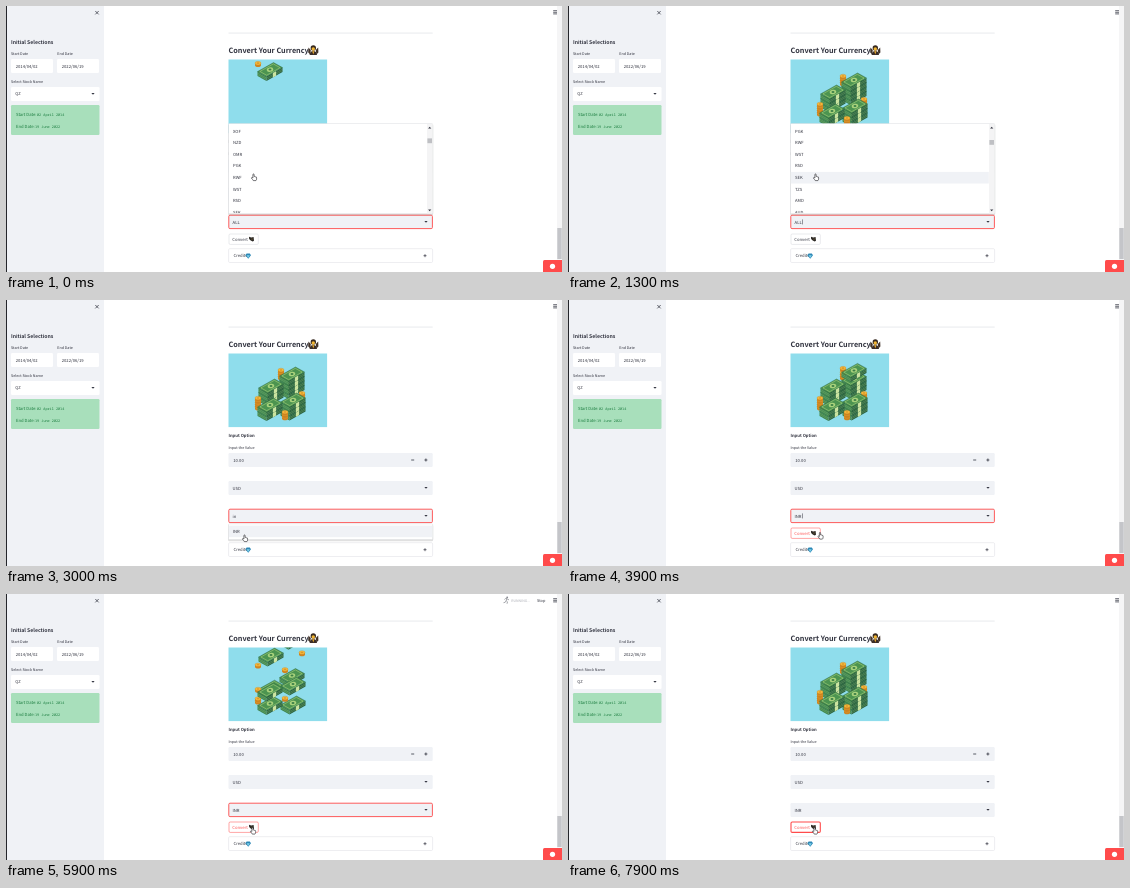
An HTML page for the animation above (8 s loop, 556 px wide and 266 px high).

```html
<!DOCTYPE html>
<html lang="en">
<head>
<meta charset="utf-8">
<title>Currency converter</title>
<style>
  html, body { margin: 0; width: 100%; height: 100%; overflow: hidden; background: #fff; }
  svg { display: block; width: 556px; height: 266px; }
  text {
    font-family: "Noto Sans CJK JP", "Noto Sans CJK SC", "Noto Sans CJK", "Open Sans", sans-serif;
    text-rendering: geometricPrecision;
    white-space: pre;
  }
  .mono { font-family: "Noto Sans Mono", "DejaVu Sans Mono", monospace; }
</style>
</head>
<body>
<svg id="stage" viewBox="0 0 556 266" xmlns="http://www.w3.org/2000/svg"></svg>
<script>
const LOOP = 8000, STEP = 100;
const INK = '#31333f', GREY = '#f0f2f6', RED = '#ff4b4b', GREEN = '#177a3c';
const ROW = 11.6;

// ---- markup helpers ----
const rect = (x, y, w, h, fill, more = '') =>
  `<rect x="${x}" y="${y}" width="${w}" height="${h}" fill="${fill}" ${more}/>`;
const line = (d, color = INK, width = .7, more = '') =>
  `<path d="${d}" fill="none" stroke="${color}" stroke-width="${width}" ${more}/>`;
const shape = (d, fill, more = '') => `<path d="${d}" fill="${fill}" ${more}/>`;
const dot = (x, y, r, fill) => `<circle cx="${x}" cy="${y}" r="${r}" fill="${fill}"/>`;
const text = (x, y, size, str, fill = INK, more = '') =>
  `<text x="${x}" y="${y}" font-size="${size}" fill="${fill}" ${more}>${str}</text>`;
const group = (id, body, more = '') => `<g id="${id}" ${more}>${body}</g>`;
const arrow = (x, y, up = 1) => shape(`M${x - 1.6} ${y - .8 * up}h3.2l-1.6 ${1.8 * up}z`, INK);
const poly = pts => 'M' + pts.map(p => p.join(' ')).join('L') + 'Z';
const BOLD = 'font-weight="700"';

// ---- money pieces ----
function bundle() {
  const at = (a, b) => [16 * a + 9 * b, -9 * a + 5 * b];
  const quad = (a, b) => poly([at(-a, -b), at(a, -b), at(a, b), at(-a, b)]);
  const [l, f, r] = [at(-.5, -.5), at(-.5, .5), at(.5, .5)];
  const drop = ([x, y], h) => [x, y + h];
  const side = (p, q, fill) => shape(poly([p, q, drop(q, 4.5), drop(p, 4.5)]), fill);
  let out = side(l, f, '#3f8550') + side(f, r, '#2a6140');
  for (const h of [1.5, 3])
    out += line(`M${drop(l, h)}L${drop(f, h)}L${drop(r, h)}`, '#8fc278', .35);
  out += shape(quad(.5, .5), '#4c9450', 'stroke="#28603a" stroke-width=".4"');
  out += line(quad(.42, .38), '#b4d884', .5);
  out += `<ellipse rx="3.3" ry="2.2" fill="#a9d27c" transform="rotate(-12)"/>`;
  out += `<ellipse rx="1.5" ry="1" fill="#3c7f47"/>`;
  const p = at(.1, .5), q = at(-.1, .5);
  return out + shape(poly([q, p, drop(p, 4.5), drop(q, 4.5)]), '#cbe4a0');
}
const coin = () =>
  shape('M-3 0v2a3 1.8 0 0 0 6 0v-2z', '#cf8420') +
  `<ellipse rx="3" ry="1.8" fill="#f6bd3e" stroke="#b8761f" stroke-width=".3"/>` +
  `<ellipse rx="1.5" ry=".8" fill="#dd9628"/>`;

// Stacks from back to front: x, top y, count, first delay, delay step
const STACKS = [
  [coin, 275, 70, 4, .42, .06],
  [bundle, 286, 74, 4, .2, .14],
  [bundle, 265, 86, 3, .16, .15],
  [coin, 296, 93, 3, .34, .1],
  [bundle, 287, 100, 3, .1, .15],
  [coin, 252, 98, 5, .01, .1],
  [bundle, 264, 105, 2, 0, .22],
  [coin, 279, 112, 3, .24, .1]
];
const pieces = [];
for (const [draw, x, top, count, delay, gap] of STACKS) {
  const h = draw === coin ? 2.2 : 4.5;
  for (let i = 0; i < count; i++)
    pieces.push({ draw, x, y: top + (count - 1 - i) * h, delay: Math.min(.65, delay + i * gap) });
}

// ---- page parts ----
function sidebar() {
  const field = (x, y, w) => rect(x, y, w, 14, '#fff', 'rx="1.2"');
  return rect(0, 0, 98, 266, GREY) + rect(0, 0, 1, 266, '#25262b') +
    line('M89.3 5l3.4 3.4M92.7 5l-3.4 3.4', INK, .75) +
    text(5, 38, 5.15, 'Initial Selections', INK, BOLD) +
    text(5, 48.6, 3.7, 'Start Date') + text(51.3, 48.6, 3.7, 'End Date') +
    field(5, 53, 42) + field(51, 53, 42) +
    text(9.7, 61.6, 4.2, '2014/04/02') + text(55.7, 61.6, 4.2, '2022/06/19') +
    text(5, 76.6, 3.7, 'Select Stock Name') +
    field(5, 81, 88.5) + text(9.3, 89.4, 4, 'QZ') + arrow(87, 87.8) +
    rect(5, 99, 88.5, 30, '#a8dfbb', 'rx="1.2"') +
    text(10, 110, 4.2, 'Start Date:', GREEN) + text(10, 122.2, 4.2, 'End Date:', GREEN) +
    text(31, 109.8, 3.5, '02 April 2014', GREEN, 'class="mono"') +
    text(29, 122, 3.5, '19 June 2022', GREEN, 'class="mono"');
}

function titleIcon() {
  return dot(307.3, 42, 2.7, '#37291f') + dot(307.3, 43, 1.7, '#f2b632') +
    shape('M302.4 41.5l2.4 2.5-.6 4.6-2-2z M312.2 41.5l-2.4 2.5.6 4.6 2-2z', '#41332a') +
    shape('M303.6 49q.4-4 3.7-4t3.7 4z', '#3a2d27') +
    shape('M306.2 45.2h2.2l-1.1 3.4z', '#e8a92c');
}

function content() {
  const box = y => rect(222.5, y, 204.2, 14, GREY, 'rx="1.2"');
  return rect(222.5, 26.7, 204.2, .7, '#dfe0e5') +
    text(222.5, 47, 7.25, 'Convert Your Currency', INK, BOLD) + titleIcon() +
    rect(222.5, 53.5, 98.6, 73.6, '#8fddec') +
    `<clipPath id="photo">${rect(222.5, 53.5, 98.6, 73.6, '#000')}</clipPath>` +
    `<g clip-path="url(#photo)">` +
    pieces.map((p, i) => group('p' + i, p.draw())).join('') + '</g>' +
    text(222.5, 137, 4.2, 'Input Option', INK, BOLD) +
    text(222.5, 148.6, 3.7, 'Input the Value') +
    box(153) + text(227.3, 161.7, 4.2, '10.00') +
    line('M405.2 160h3M418.4 160h3M419.9 158.5v3', INK, .8) +
    box(181) + text(226.6, 189.7, 4.2, 'USD') + arrow(420, 187.8) +
    box(209) + rect(222.8, 209.2, 203.6, 13.4, 'none', `id="ring" rx="1.2" stroke="${RED}" stroke-width=".9"`) +
    text(226.6, 217.6, 4.2, '', INK, 'id="value"') +
    rect(0, 213.4, .5, 5, INK, 'id="caret"') + arrow(420, 215.8) +
    rect(223, 228, 29.3, 10.4, '#fff', 'id="button" rx="1.2"') +
    text(226.3, 234.9, 4.2, 'Convert', INK, 'id="label"') +
    shape('M243 230.8l2.2.6 2.4-.3.4 3.6-1.3.8-2-1-1.6-1.6z', '#2c2925') + dot(246, 233, .6, '#8a7340') +
    rect(222.6, 242.7, 204, 13.8, '#fff', 'rx="1.2" stroke="#dcdde2" stroke-width=".5"') +
    text(227.5, 251.3, 4.2, 'Credits') +
    shape('M240.6 247.6h3.2l1.2 1.7-2.8 3.5-2.8-3.5z', '#2a86b5') +
    shape('M240.6 249.2h3.2l-1.6 2.8z', '#7ed0ea') +
    line('M417.5 249.7h3M419 248.2v3', INK, .7);
}

function chrome() {
  const runner = dot(501.2, 3.3, .9, '#85878f') +
    line('M500.9 4.4l-.8 2.2 1.4 1.2-.5 2M500.1 6.6l-.9 1.7-1.7.4M498.5 5.6l1-1.2 1.4 0 .9 1.2 1.2.1', '#85878f', .7);
  return rect(551, 0, 5, 266, '#f5f5f6') + rect(551.3, 222, 4.4, 31, '#c4c5c9') +
    line('M547.2 4.7h3.8M547.2 6.3h3.8M547.2 7.9h3.8', INK, .75) +
    group('running', runner + text(505.3, 7.7, 3.5, 'RUNNING...', '#a9abb3') + text(531, 7.9, 3.9, 'Stop')) +
    shape('M537 266v-10.5q0-1.5 1.5-1.5h17.5v12z', RED) + dot(546.5, 260.3, 2.6, '#fff');
}

const NAMES = ['XOF', 'NZD', 'OMR', 'PGK', 'RWF', 'WST', 'RSD', 'SEK', 'TZS', 'AMD', 'AUD'];
const FOUND = ['IDR', 'ILS', 'INR', 'IQD', 'IRR', 'ISK', 'BIF', 'CLP'];
const rows = list => list.map((n, i) => text(227, 126.6 + i * ROW, 4.2, n)).join('');

function menus() {
  const panel = (y, h) =>
    rect(222, y + .8, 205.2, h + .8, '#000', 'opacity=".12" rx="1.5"') +
    rect(222.5, y, 204.2, h, '#fff', 'rx="1" stroke="#d2d3d8" stroke-width=".4"');
  const long = panel(117.5, 90.2) +
    rect(222.8, 165.9, 198, ROW, GREY, 'id="hover"') +
    `<clipPath id="list">${rect(222.5, 118, 199, 89, '#000')}</clipPath>` +
    `<g clip-path="url(#list)">${group('names', rows(NAMES))}${group('found', rows(FOUND))}</g>` +
    rect(421, 118, 5.4, 89.3, '#f4f4f5') +
    rect(421.4, 132.4, 4.6, 4.8, '#bfc0c4', 'id="thumb"') +
    arrow(423.7, 121.8, -1) + arrow(423.7, 204.2);
  const short = panel(223.8, 15.8) + rect(222.8, 225.6, 203.6, ROW, GREY) + text(226.8, 232.6, 4.2, 'INR');
  return group('long', long) + group('short', short);
}

const hand = shape(
  'M-1.1 1v-3.3q0-.8.6-.8t.6.8v1.7q1.1-.2 1.3.4 1.2-.2 1.2 1v1.1q0 1-.7 1.7h-2.6q-.5-1-1.7-2.2-.4-.8.3-.9.6 0 1 .5z',
  '#fff', 'stroke="#1c1c20" stroke-width=".6" stroke-linejoin="round"');

document.getElementById('stage').innerHTML =
  rect(0, 0, 556, 266, '#fff') + sidebar() + content() + menus() + chrome() + group('cursor', hand);

// ---- motion ----
const $ = id => document.getElementById(id);
const show = (id, on) => $(id).setAttribute('visibility', on ? 'inherit' : 'hidden');
const move = (id, x, y) => $(id).setAttribute('transform', `translate(${x} ${y})`);
const clamp = v => Math.max(0, Math.min(1, v));
const smooth = v => v * v * (3 - 2 * v);

function track(keys, t, ease = v => v) {
  let i = 0;
  while (i < keys.length - 1 && keys[i + 1][0] <= t) i++;
  const a = keys[i], b = keys[i + 1];
  if (!b) return a.slice(1);
  const k = ease(clamp((t - a[0]) / (b[0] - a[0])));
  return a.slice(1).map((v, n) => v + (b[n + 1] - v) * k);
}

// How far the money has landed: 0 is all out of view, 1 is settled
const LANDED = [
  [0, .1], [1100, 1], [1400, 1], [1900, 0], [2700, 1], [3600, 1], [3900, .9], [4200, .86],
  [5000, .86], [5300, .65], [5600, .1], [6200, .82], [6600, .82], [6700, .85], [6800, .9],
  [7100, .9], [7400, .97], [7700, .97], [7900, 1]
];
const POINTER = [
  [0, 248, 171], [1900, 248, 171], [2700, 239, 238], [3500, 239, 238],
  [3900, 252.5, 235.5], [4200, 247, 236.5]
];
const SCROLL = [[0, 0], [100, 0], [900, 1]];
const TYPED = [[0, 'ALL', 232.9 + 1.4], [2000, 'i', 228.2], [2200, 'in', 230.7], [3500, 'INR', 234.1]];

function render(t) {
  const [landed] = track(LANDED, t);
  pieces.forEach((p, i) => {
    const away = clamp((p.delay + .35 - landed) / .35);
    move('p' + i, p.x, p.y - 90 * away * away);
  });

  const [scroll] = track(SCROLL, t, smooth);
  move('names', 0, -3 * ROW * scroll);
  move('thumb', 0, 1.6 * scroll);
  show('long', t < 2200);
  show('names', t < 2000);
  show('found', t >= 2000 && t < 2200);
  show('hover', t >= 1000 && t < 2000);
  show('short', t >= 2200 && t < 3500);

  const [, value, caretX] = TYPED.filter(k => k[0] <= t).pop();
  $('value').textContent = value;
  $('caret').setAttribute('x', caretX);
  show('caret', t < 3500 ? t % 1000 >= 300 && t % 1000 < 800 : t < 4000);
  show('ring', t < 7300);

  const hot = t >= 3800, focus = t >= 6100;
  $('button').setAttribute('stroke', hot ? RED : '#d3d4da');
  $('button').setAttribute('stroke-width', focus ? 1.1 : .5);
  $('label').setAttribute('fill', hot ? RED : INK);

  show('running', t >= 4600 && t < 7300);
  move('cursor', ...track(POINTER, t, smooth));
}

const start = performance.now();
function tick() {
  const t = (performance.now() - start) % LOOP;
  render(Math.floor(t / STEP) * STEP);
  requestAnimationFrame(tick);
}
tick();
</script>
</body>
</html>
```
